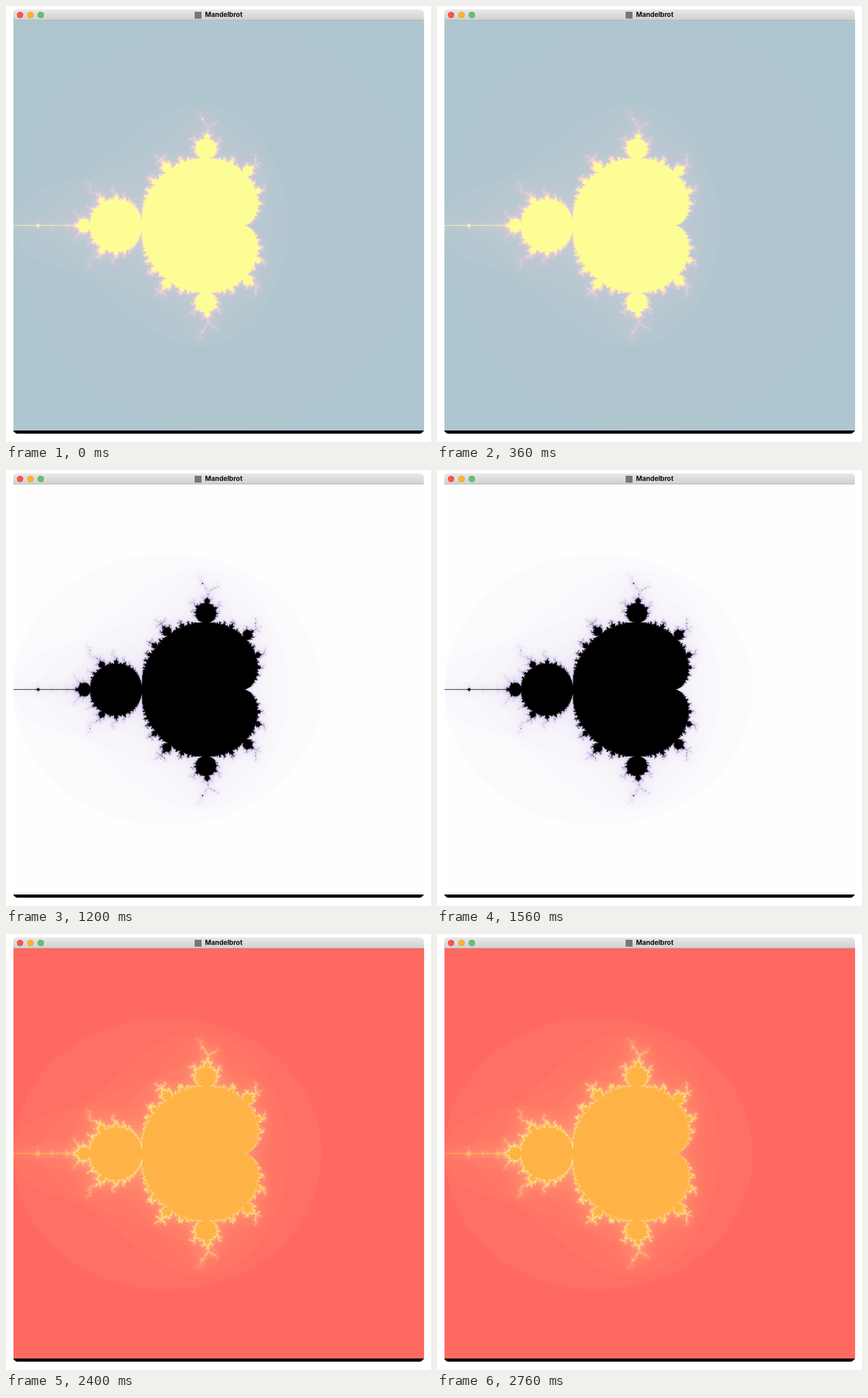
Animation of 739 by 758 pixels, one loop 3 s. Source, as an HTML page with a canvas:

```html
<!DOCTYPE html>
<html lang="en">
<head>
<meta charset="utf-8">
<title>Mandelbrot</title>
<style>
  html, body { margin: 0; width: 100%; height: 100%; overflow: hidden; background: #fff; }
  .window { position: absolute; left: 12px; top: 6px; width: 715px; height: 738px; }
  .bar {
    position: absolute; z-index: 1; inset: 0 0 auto; height: 19px; box-sizing: border-box;
    border-bottom: 1px solid #b4b4b4; background: linear-gradient(#e8e8e8, #d1d1d1);
    clip-path: inset(0 .5px round 6px 6px 0 0);
  }
  .light {
    position: absolute; top: 4px; width: 11px; height: 11px; box-sizing: border-box;
    border: 1px solid rgba(0, 0, 0, .12); border-radius: 50%;
  }
  .icon { position: absolute; left: 316px; top: 4px; width: 12px; height: 12px; background: #777; }
  .title {
    position: absolute; left: 334px; top: 0; white-space: nowrap; color: #0c0c0c;
    font: 700 11.6px/19px Inter, sans-serif;
  }
  .base {
    position: absolute; left: 0; top: 732px; width: 715px; height: 6px; background: #000;
    clip-path: polygon(.5px 0, 714.5px 0, 713.5px 2px, 709px 5.5px, 6px 5.5px, 1.5px 2px);
  }
  canvas { position: absolute; left: 0; top: 18px; visibility: hidden; animation: show 3s step-end infinite; }
  @keyframes show {
    0% { visibility: visible; }
    20%, 100% { visibility: hidden; }
  }
</style>
</head>
<body>
<div class="window">
  <div class="bar">
    <i class="light" style="left:7px;background:#ff544d"></i>
    <i class="light" style="left:25px;background:#fdb52b"></i>
    <i class="light" style="left:43px;background:#65c06f"></i>
    <i class="icon"></i>
    <span class="title">Mandelbrot</span>
  </div>
  <div class="base"></div>
</div>
<script>
// The plane is sampled on a SIZE grid and scaled down to VIEW pixels.
const SIZE = 800, VIEW = 714, LIMIT = 80, HALF = LIMIT / 2;

// Three colour stops, and the band that shares the shade of the one before it.
const themes = [
  { stops: [0xaec6cf, 0xffd1dc, 0xfdfd96], flat: 3 },
  { stops: [0x000200, 0x77dd77, 0xffffff], flat: 2 },
  { stops: [0xfefefe, 0xc3b1e1, 0x000000], flat: 2 },
  { stops: [0xd3d3d3, 0x000000, 0xc3b1e1], flat: 3 },
  { stops: [0xff6961, 0xfdfd96, 0xffb347], flat: 2 }
];

function escapeCount(cr, ci) {
  let zr = 0, zi = 0, n = 0;
  for (; n < LIMIT; n++) {
    const r2 = zr * zr, i2 = zi * zi;
    if (r2 + i2 > 4) break;
    zi = 2 * zr * zi + ci;
    zr = r2 - i2 + cr;
  }
  return n;
}

// Packs a blend of two colours in canvas byte order.
function mix(a, b, t) {
  const channel = s => {
    const from = a >> s & 255, to = b >> s & 255;
    return Math.round(from + (to - from) * t);
  };
  return (255 << 24 | channel(0) << 16 | channel(8) << 8 | channel(16)) >>> 0;
}

function makePalette({ stops: [a, b, c], flat }) {
  return Uint32Array.from({ length: LIMIT + 1 }, (_, n) => {
    if (n === LIMIT) return mix(c, c, 0);
    const k = Math.max(0, n === flat ? n - 2 : n - 1);
    return k < HALF ? mix(a, b, k / HALF) : mix(b, c, k / HALF - 1);
  });
}

function makeCanvas(width, height) {
  const canvas = document.createElement('canvas');
  canvas.width = width;
  canvas.height = height;
  return canvas;
}

const counts = new Uint8Array(SIZE * SIZE);
for (let y = 0; y < SIZE; y++)
  for (let x = 0; x < SIZE; x++)
    counts[y * SIZE + x] = escapeCount(4 * x / SIZE - 2, 2 - 4 * y / SIZE);

const grid = makeCanvas(SIZE, SIZE);
const gridCtx = grid.getContext('2d');
const image = gridCtx.createImageData(SIZE, SIZE);
const pixels = new Uint32Array(image.data.buffer);

themes.forEach((theme, i) => {
  const palette = makePalette(theme);
  counts.forEach((n, p) => { pixels[p] = palette[n]; });
  gridCtx.putImageData(image, 0, 0);

  const view = makeCanvas(VIEW + 1, VIEW);
  view.style.animationDelay = `${i * 600 - 3000}ms`;
  view.getContext('2d').drawImage(grid, 0.5, 0.2, VIEW, VIEW);
  document.querySelector('.window').append(view);
});
</script>
</body>
</html>
```
